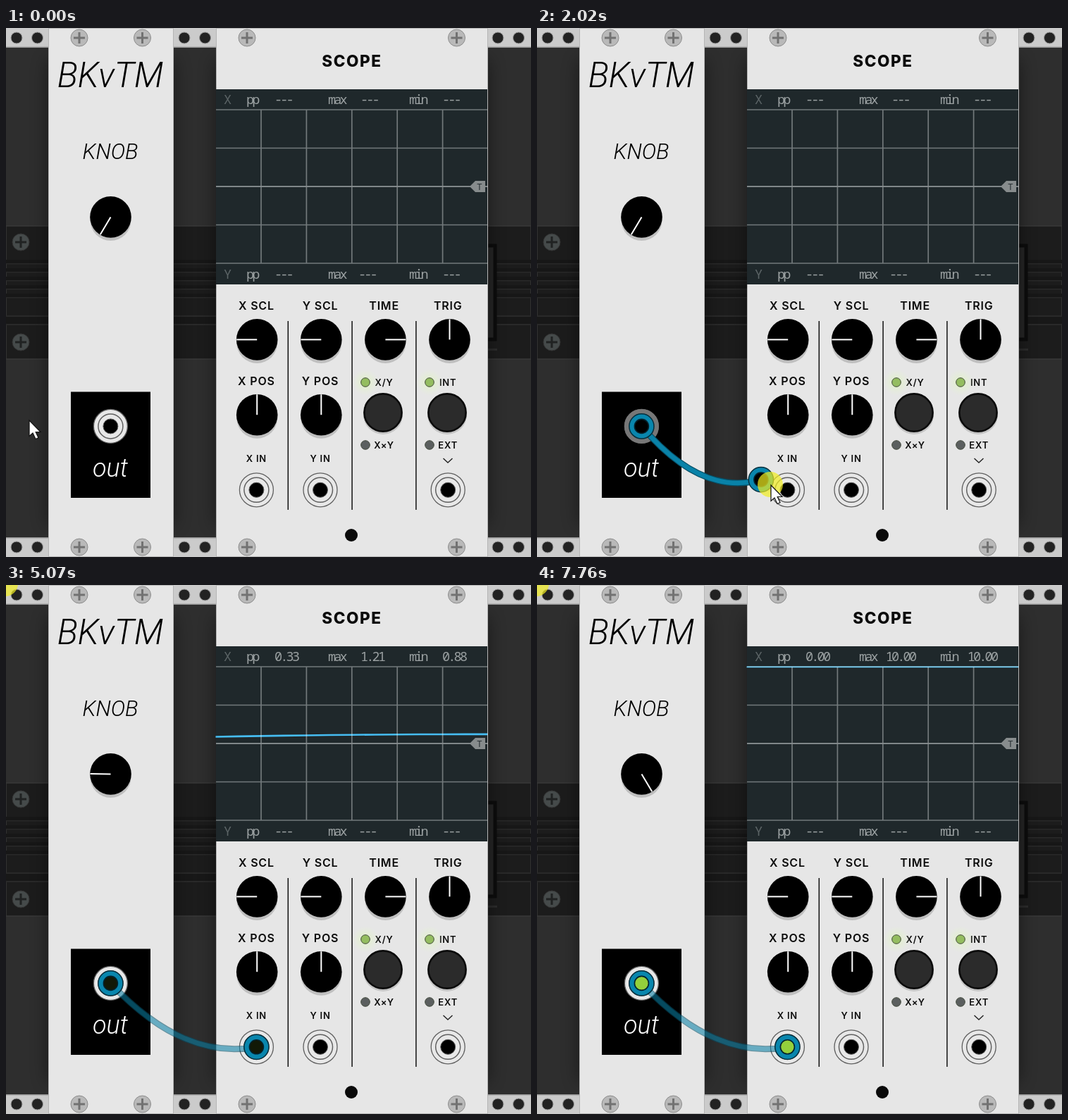
Write an HTML page that moves like this. It is 745x751 px and loops after 8 s.

```html
<!DOCTYPE html>
<html lang="en">
<head>
<meta charset="utf-8">
<title>Knob and scope</title>
<style>
html, body { margin: 0; width: 100%; height: 100%; overflow: hidden; background: #2d2d2d; }
svg { display: block; width: 745px; height: 751px; }
.label { font: 600 16px Inter, sans-serif; letter-spacing: .8px; text-anchor: middle; fill: #0c0c0c; }
.small { font-size: 13px; }
.title { font-size: 22.5px; font-weight: 800; letter-spacing: 1.6px; }
.thin { font: italic 300 31px Roboto, sans-serif; text-anchor: middle; }
.lcd { font: 300 18.5px "Noto Sans Mono", monospace; letter-spacing: -2.8px; fill: #9ba1a2; white-space: pre; }
.dim { fill: #5d6567; }
</style>
</head>
<body>
<svg id="stage" viewBox="0 0 745 751" xmlns="http://www.w3.org/2000/svg"></svg>
<script>
const stage = document.getElementById('stage');
const el = id => document.getElementById(id);
const set = (id, attrs) => { for (const k in attrs) el(id).setAttribute(k, attrs[k]); };
const show = (id, on) => set(id, { visibility: on ? 'visible' : 'hidden' });
const repeat = (n, make) => Array.from({ length: n }, (_, i) => make(i)).join('');

const rect = (x, y, w, h, fill, more = '') =>
  `<rect x="${x}" y="${y}" width="${w}" height="${h}" fill="${fill}" ${more}/>`;
const circle = (x, y, r, fill, more = '') =>
  `<circle cx="${x}" cy="${y}" r="${r}" fill="${fill}" ${more}/>`;
const path = (d, stroke, w, more = '') =>
  `<path d="${d}" fill="none" stroke="${stroke}" stroke-width="${w}" ${more}/>`;
const text = (x, y, s, cls, more = '') =>
  `<text x="${x}" y="${y}" class="${cls}" ${more}>${s}</text>`;

const OUT = { x: 148.4, y: 565.4 };
const IN = { x: 355.4, y: 655.8 };
const HAND = { x: 148.5, y: 268.4 };
const column = i => IN.x + i * 90.6;

const screw = (x, y, fill = '#b9b9b9', edge = '#8c8c8c', cross = '#727272') =>
  circle(x, y, 12, fill, `stroke="${edge}"`) +
  path(`M${x - 8} ${y}h16M${x} ${y - 8}v16`, cross, 3);

const knob = (x, y, angle, id = '') =>
  circle(x, y + 4.5, 29, '#000', 'opacity=".17"') + circle(x, y, 29.3, '#000') +
  `<line ${id && `id="${id}"`} x1="${x}" y1="${y}" x2="${x}" y2="${y - 29}" stroke="#fff" stroke-width="2" transform="rotate(${angle} ${x} ${y})"/>`;

const jack = (x, y) =>
  circle(x, y, 24, '#e8e8e8', 'stroke="#606060" stroke-width="1.3"') +
  circle(x, y, 17.5, 'none', 'stroke="#606060" stroke-width="1.5"') +
  circle(x, y, 10.5, '#000', 'stroke="#606060"');

const plug = (id, { x, y }) => `<g id="${id}" transform="translate(${x} ${y})">` +
  circle(0, 0, 17.6, '#0986ad', 'stroke="#052f3d" stroke-width="1.5"') +
  circle(0, 0, 10, '#000', 'class="light" stroke="#04222d" stroke-width="1.6"') + '</g>';

const led = (x, y, on) =>
  (on ? circle(x, y, 19, 'url(#glow)') : '') +
  circle(x, y, 6.3, on ? '#94bd60' : '#5b5f5f', 'stroke="#424a3c"');

const panel = (x, w) =>
  rect(x, 45, w, 660, '#000', 'opacity=".45" filter="url(#soft)"') +
  rect(x + .5, .5, w - 1, 750, '#e6e6e6', 'stroke="#b5b5b5"') +
  [x + 44, x + w - 44.5].map(sx => screw(sx, 14) + screw(sx, 737)).join('');

function rail(y, edge) {
  const holes = [15, 253, 698].map(x => [x, x + 29.5]).flat();
  return rect(0, y, 745, 28, '#cbcbcb') + rect(0, edge, 745, 1.5, '#999') +
    holes.map(x => circle(x, y + 14, 8, '#222', 'stroke="#999"')).join('');
}

function rack() {
  return rect(0, 0, 745, 751, '#2e2e2e') +
    rect(0, 281, 745, 189, '#1c1c1c', 'stroke="#383838" stroke-width="1.500"') +
    repeat(5, i => rect(0, 329 + i * 12, 745, 5, '#171717') + rect(0, 334 + i * 12, 745, 1.5, '#292929')) +
    rect(-2, 409, 749, 12, '#181818', 'stroke="#292929" stroke-width="2"') +
    rect(670, 309, 24, 133, '#262626', 'stroke="#0d0d0d" stroke-width="5"') + rect(683, 455, 14, 3, '#2c2c2c') +
    [304, 446].map(y => screw(21, y, '#454a4a', '#333', '#202222')).join('');
}

function source() {
  return panel(60, 178) +
    text(148, 84, 'BKvTM', 'thin', 'style="font-size:49px"') + text(148, 186, 'KNOB', 'thin') +
    knob(HAND.x, HAND.y, 0, 'hand') + rect(92, 516.5, 113, 150.5, '#000') + jack(OUT.x, OUT.y) +
    text(148, 637, 'out', 'thin', 'fill="#fff" style="font-size:36px"');
}

function screen() {
  const grid = repeat(5, i => `M${362 + i * 64.4} 116V334M298 ${116 + i * 54.5}H683`);
  let s = rect(298, 87, 385, 277, '#1f282b') + path(grid, '#72797b', 1.7) + path('M298 225H683', '#8d9395', 1.5) +
    path('', '#2cb1ef', 2.6, 'id="trace" clip-path="url(#view)" style="mix-blend-mode:screen"') +
    '<path d="M658 225L666 217H680V233H666Z" fill="#878c8d"/>' +
    text(672, 230, 'T', '', 'font-family="Noto Sans Mono, monospace" font-size="13" text-anchor="middle" fill="#2b3336"');
  for (const [axis, y] of [['X', 108], ['Y', 356]]) {
    s += text(309, y, axis, 'lcd dim');
    ['pp', 'max', 'min'].forEach((name, i) => {
      s += text(i ? 342 + i * 115 : 341, y, name, 'lcd') + text(valueX(i), y, '---', 'lcd', `id="${axis + name}"`);
    });
  }
  return s;
}
const valueX = i => 381 + i * 119;

function scope() {
  const row = (names, y, cls, first = 0) =>
    names.map((n, i) => text(column(i + first), y, n, cls)).join('');
  return panel(298, 386) + text(491, 54.5, 'SCOPE', 'label title') + screen() +
    row(['X SCL', 'Y SCL', 'TIME', 'TRIG'], 400, 'label') + row(['X POS', 'Y POS'], 507, 'label') +
    row(['X IN', 'Y IN'], 616, 'label small') +
    row(['X/Y', 'INT'], 508, 'label small', 2) + row(['X×Y', 'EXT'], 597, 'label small', 2) +
    repeat(3, i => path(`M${400.3 + i * 90.8} 416V684`, '#111', 1.5)) +
    [-90, -90, 90, 0].map((a, i) => knob(356.2 + i * 91.1, 442.4, a)).join('') +
    repeat(2, i => knob(356.2 + i * 91.1, 549.2, 0)) +
    [535, 626].map(x => circle(x, 549, 28, '#000', 'opacity=".15"') +
      circle(x, 546, 26.6, '#2b2b2b', 'stroke="#0b0b0b" stroke-width="2.600"') +
      led(x - 25, 503, true) + led(x - 25, 592, false)).join('') +
    [0, 1, 3].map(i => jack(column(i), IN.y)).join('') +
    path('M620.5 611L627 617L633.5 611', '#222', 1.4) + circle(490, 720, 9, '#0a0a0a');
}

stage.innerHTML = `<defs>
  <filter id="soft" x="-30%" y="-10%" width="160%" height="120%"><feGaussianBlur stdDeviation="13"/></filter>
  <clipPath id="view">${rect(297, 115.5, 387, 219, '#000')}</clipPath>
  <radialGradient id="glow"><stop offset=".25" stop-color="#e0f5c0" stop-opacity=".6"/><stop offset="1" stop-color="#e6f5d0" stop-opacity="0"/></radialGradient>
  </defs>` + rack() + rail(0, 26.5) + rail(723, 723) + source() + scope() +
  `<g id="patch">${circle(OUT.x, OUT.y, 21, 'none', 'id="shade" stroke="#777" stroke-width="7"')}
  <g id="cable">${path('', '#064f66', 9, 'class="wire"')}${path('', '#0982a8', 6.6, 'class="wire"')}</g>
  ${plug('fixed', OUT)}${plug('free', IN)}</g>` +
  circle(0, 0, 18, '#f3ee20', 'id="press" opacity=".7"') +
  '<path id="cursor" d="M0 0V22.5L5 18L9 26.500L13 24.800L9.200 16.500H16Z" fill="#fff" stroke="#111" stroke-width="1.2"/>';

const LOOP = 8000, TICK = 60;
const PICK = 1130, DROP = 2270, GRAB = 4340;
const FIRST = [4580, 6250], SECOND = [6510, 7450];

// Spans in which the picture moves; it rests between them
const spans = [
  [300, 900], [PICK, 1910], [1960, 2520], [2700, 3460], [3510, 4130],
  [GRAB, GRAB], [4640, 5390], [5470, 6250], [6510, 7250], [7330, 7450]
];
const stops = [
  [240, 33, 557], [740, 156, 558], [900, 136, 566], [PICK, 136, 564], [1430, 228, 591],
  [2020, 332, 649], [2280, 356, 654], [2640, 358, 654], [3460, 156, 353], [4130, 149, 274]
];

const clamp = (v, lo, hi) => Math.max(lo, Math.min(hi, v));
const ramp = (t, [a, b]) => clamp((t - a) / (b - a), 0, 1);

function held(t) {
  const span = spans.filter(([a]) => a <= t).pop();
  if (!span) return 0;
  const [a, b] = span;
  return t >= b ? b : a + Math.floor((t - a) / TICK) * TICK;
}

function pointer(t) {
  const i = clamp(stops.findIndex(s => s[0] > t), 0, stops.length);
  if (t >= stops[stops.length - 1][0]) return stops[stops.length - 1].slice(1);
  if (!i) return stops[0].slice(1);
  const p = stops[i - 1], q = stops[i], f = ramp(t, [p[0], q[0]]);
  return [p[1] + (q[1] - p[1]) * f, p[2] + (q[2] - p[2]) * f];
}

function drawPatch(t) {
  const done = t >= DROP;
  set('patch', { display: t >= PICK ? 'inline' : 'none' });
  // A dragged plug trails the pointer
  const [px, py] = pointer(t - 80);
  const { x, y } = done ? IN : { x: Math.max(px, OUT.x), y: Math.max(py, OUT.y) };
  const sag = 50 + .066 * Math.hypot(x - OUT.x, y - OUT.y);
  const d = `M${OUT.x} ${OUT.y}Q${(OUT.x + x) / 2} ${(OUT.y + y) / 2 + sag} ${x} ${y}`;
  document.querySelectorAll('.wire').forEach(w => w.setAttribute('d', d));
  set('cable', { opacity: done ? .57 : 1 });
  set('free', { transform: `translate(${x} ${y})` });
  show('shade', t >= PICK && !done);
}

function drawScope(t) {
  const on = t >= DROP;
  const turn = 7 * ramp(t, FIRST) + 3 * ramp(t, SECOND);
  const v = 6.92 * ramp(t, FIRST) ** 1.4 + 3.08 * ramp(t, SECOND);

  // The sweep bends while the voltage moves and leaves older samples on its right
  const resting = t >= FIRST[1] && t <= SECOND[0];
  const room = Math.min(v, 10 - v);
  const bend = Math.min(resting ? .04 : .33, room), step = Math.min(.35, room);
  const phase = (Math.min(t, resting ? FIRST[1] : t) - 5060) * .0043025;
  const split = room > 0 ? 1 - (phase - Math.floor(phase)) : 1;
  const low = split < 1 ? v - step : v - bend;
  const yOf = u => 225 - u * 10.9;
  const curve = repeat(13, i => {
    const f = i / 12;
    return `${i ? 'L' : 'M'}${297.5 + split * f * 386} ${yOf(v - bend * (1 - split * f) ** 2)}`;
  });
  set('trace', { d: curve + (split < 1 ? `V${yOf(low)}H683.5` : '') });
  show('trace', on);

  const values = { pp: v - low, max: v, min: low };
  Object.keys(values).forEach((name, i) => {
    const s = on ? values[name].toFixed(2) : '---', node = el('X' + name);
    node.setAttribute('x', valueX(i) + 3 * (i == 1) - (s.length > 4 ? 8.3 : 0));
    if (node.textContent !== s) node.textContent = s;
  });

  const glow = [148, 208, 60].map(c => Math.round(c * v / 10));
  document.querySelectorAll('.light').forEach(c => c.setAttribute('fill', `rgb(${glow})`));
  set('hand', { transform: `rotate(${-149.4 + turn * 29.88} ${HAND.x} ${HAND.y})` });
}

function drawPointer(t) {
  const grabbed = t >= GRAB, [x, y] = grabbed ? [0, -1] : pointer(t);
  set('cursor', { transform: `translate(${x} ${y})` });
  set('press', { cx: x - 1, cy: y - 1 });
  show('cursor', !grabbed);
  show('press', grabbed || (t >= PICK && t < DROP));
}

const start = performance.now();
function frame() {
  const t = held((performance.now() - start) % LOOP);
  drawPatch(t);
  drawScope(t);
  drawPointer(t);
  requestAnimationFrame(frame);
}
frame();
</script>
</body>
</html>
```
